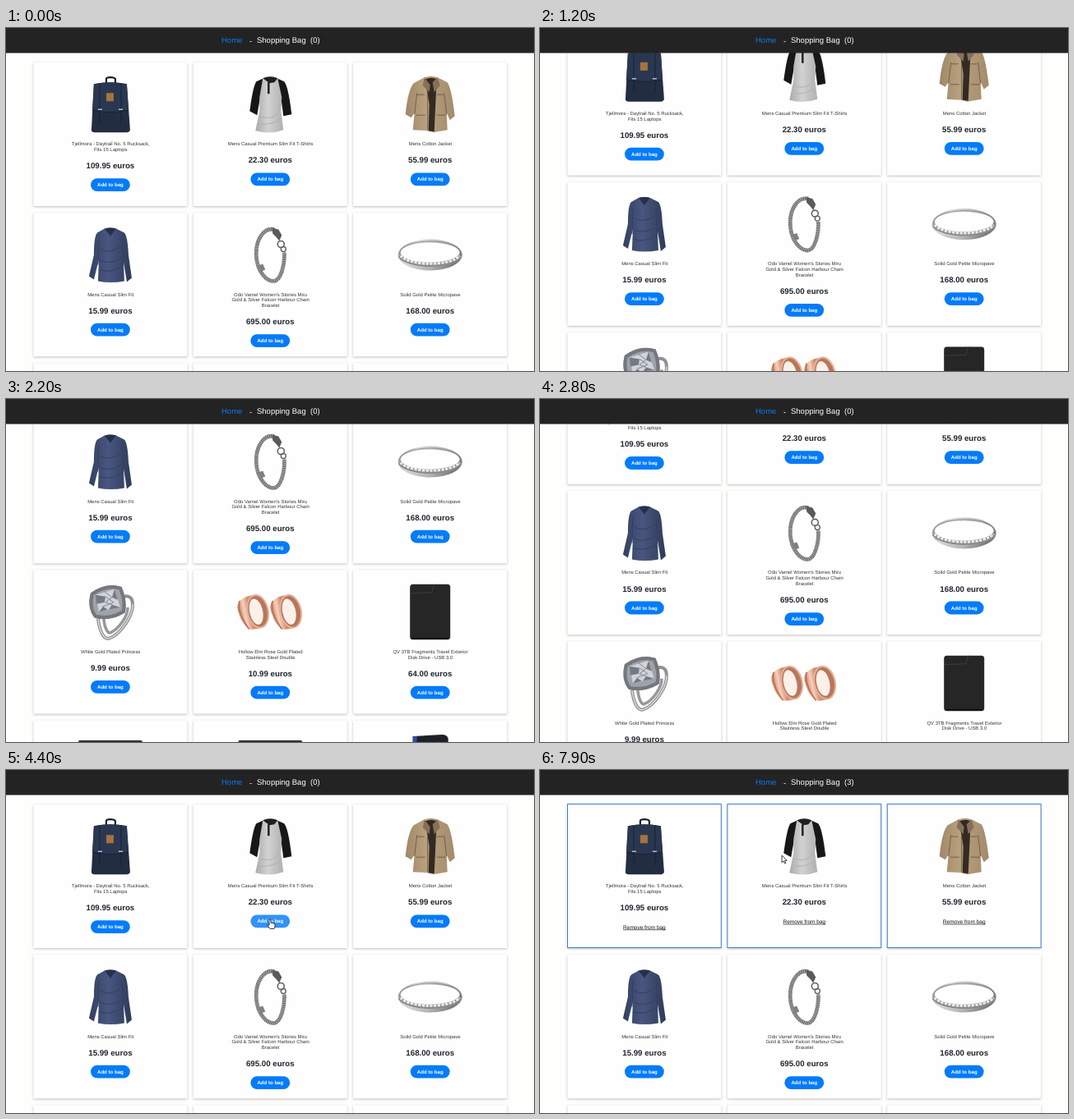
These frames come from a looping animation (642 by 418 pixels, 8000 ms). An HTML page:

```html
<!DOCTYPE html>
<html lang="en">
<head>
<meta charset="utf-8">
<title>Shop</title>
<style>
  html, body { margin: 0; height: 100%; overflow: hidden; background: #fefefd; }
  svg { display: block; width: 100vw; height: 100vh; font-family: "Liberation Sans", Arial, sans-serif; }
  text { text-rendering: geometricPrecision; }
  .card { fill: #fefefe; filter: drop-shadow(0 1.5px 1.5px rgba(0, 0, 0, .25)); }
  .border { fill: none; stroke: #3f80d2; }
  .title { font-size: 5.95px; fill: #34363a; }
  .price { font-size: 9.7px; font-weight: bold; fill: #20252f; }
  .label { font-size: 6.1px; font-weight: bold; fill: #fff; }
  .link { font-size: 6.5px; fill: #111; text-decoration: underline; }
  .card-group text { text-anchor: middle; }
  .nav { font-size: 9.5px; fill: #fff; }
</style>
</head>
<body>
<svg id="stage" viewBox="0 0 642 418">
  <defs>
    <linearGradient id="steel" x2="1" y2=".3">
      <stop stop-color="#808080"/><stop offset=".3" stop-color="#d8d8d8"/>
      <stop offset=".7" stop-color="#b4b4b4"/><stop offset="1" stop-color="#7c7c7c"/>
    </linearGradient>
    <linearGradient id="rose" x2="1">
      <stop stop-color="#c9805f"/><stop offset=".3" stop-color="#f6d0bd"/>
      <stop offset=".55" stop-color="#d18b6c"/><stop offset="1" stop-color="#e8b097"/>
    </linearGradient>
    <linearGradient id="grey" x2="1">
      <stop stop-color="#aaa"/><stop offset=".45" stop-color="#d2d2d2"/><stop offset="1" stop-color="#b0b0b0"/>
    </linearGradient>
    <linearGradient id="blue" x2="1">
      <stop stop-color="#34405f"/><stop offset=".45" stop-color="#485680"/><stop offset="1" stop-color="#303b5a"/>
    </linearGradient>
    <linearGradient id="tan" x2="1">
      <stop stop-color="#9f8768"/><stop offset=".4" stop-color="#b8a07e"/><stop offset="1" stop-color="#a38b6c"/>
    </linearGradient>
  </defs>
  <g id="page"></g>
  <rect width="642" height="30.5" fill="#232323"/>
  <g class="nav">
    <text x="262" y="18" style="fill:#0a78f5">Home</text>
    <text x="296" y="18.5">-</text>
    <text id="bag" x="305" y="18"></text>
  </g>
  <g id="cursor" stroke="#111" stroke-width=".8" fill="#fff" stroke-linejoin="round">
    <path id="arrow" d="M0 0V8.7L2 6.9 3.5 10 4.9 9.4 3.5 6.4H6.2Z"/>
    <path id="hand" d="M-1 0Q0-1 1 0V4Q2 3 3 4.3 4 3.6 4.7 4.8 6 4.3 6 6V8.5L5 11H0L-2.9 7Q-3.3 5.2-1 6.7Z"/>
  </g>
</svg>
<script>
const $ = id => document.getElementById(id);

// Product pictures are drawn around (0, 0), about 68 px tall.
const art = {
  backpack: `
    <path d="M-5-24V-31Q-5-33 0-33T6-31V-24" fill="none" stroke="#171d2b" stroke-width="2.2"/>
    <path d="M-20-25Q0-29 20-25L24 31Q23 34 20 34H-19Q-23 34-23 31Z" fill="#222d42"/>
    <path d="M-20-25Q0-29 20-25L22 7Q0 12-22 7Z" fill="#293850"/>
    <path d="M-13-26V23M13-26V23M-22 7Q0 12 22 7" fill="none" stroke="#172136" stroke-width="1"/>
    <path d="M-15 6h5M10 6h5" stroke="#b5bcc6" stroke-width="1.6"/>
    <rect x="-5" y="-14" width="9" height="10" fill="#a5733f"/>`,
  baseball: `
    <path d="M-8-32L-17-28Q-21-22-25 8L-16 13-12-10-6-27ZM8-32L17-28Q22-22 26 12L16 14 13-9 6-27Z" fill="#171717"/>
    <path d="M-9-32Q0-36 9-32L14-9 13 8 16 31Q0 37-18 32L-13 8-13-9Z" fill="url(#grey)"/>
    <path d="M-9-32Q0-36 9-32L5-27-1-26Z" fill="#202020"/>
    <path d="M-2-27V-13" stroke="#222" stroke-width="2.5"/>
    <path d="M-11 15Q3 20 11 8M-12 24Q4 25 13 17" fill="none" stroke="#aaa" stroke-width=".8"/>`,
  jacket: `
    <path d="M-7-33Q1-36 9-33L21-27Q26-20 30 14L24 19 20 10 21 31 4 34-4 32-21 31-19 10-23 16-30 12Q-27-18-20-26Z" fill="url(#tan)"/>
    <path d="M-6-31Q2-34 8-31L5 33-2 32-1 0Z" fill="#332a23"/>
    <path d="M-7-33L-9-23-1-15 0-24ZM9-33L12-23 5-15 3-27Z" fill="#86705a"/>
    <path d="M-19 12L-16-14M20 12L17-14M-16-12h9M8-12h8M-17 13h11M8 13h11M-3-15V31" fill="none" stroke="#6d5b43" stroke-width=".9"/>`,
  sweater: `
    <path d="M-7-32Q0-34 7-32L17-27Q21-23 22 0L26 28 20 33 16 8 17 32Q0 35-15 32L-14 6-20 30-26 26-20 0Q-20-23-16-27Z" fill="url(#blue)"/>
    <path d="M-7-32Q0-34 7-32L0-23Z" fill="#26304c"/>
    <path d="M-12-7Q0-1 12-10M-13 7Q1 12 13 4M-14 18Q0 23 14 14M-14-20L-15 12M14-20L16 12" fill="none" stroke="#333f60" stroke-width="1"/>`,
  bracelet: `
    <g fill="none" stroke="#636361">
      <path id="chain" d="M5-31C-8-34-18-18-17 1S-5 32 4 32 18 11 17-3" stroke-width="4.6"/>
      <use href="#chain" stroke="#b5b5b1" stroke-width="2.6" stroke-dasharray="1 1.2"/>
      <circle cx="13" cy="-13" r="4" stroke-width="1.6"/><circle cx="16" cy="-7" r="3" stroke-width="1.4"/>
    </g>
    <path d="M2-33L10-31 14-24 11-17 7-22 3-26Z" fill="#5a5a58"/>
    <path d="M-15 13L-9 11-6 18-11 20Z" fill="#80807d"/>`,
  ring: `
    <ellipse rx="39" ry="19" fill="url(#steel)"/>
    <ellipse cy="-3" rx="36" ry="12" fill="#fefefe"/>
    <ellipse cy="-2" rx="37" ry="14.5" fill="none" stroke="#858585" stroke-width=".8"/>
    <path d="M-37 1A38 14.5 0 0 0 37 1" fill="none" stroke="#8b8b8b" stroke-width="4.5"/>
    <path d="M-36 1A38 14.5 0 0 0 36 1" fill="none" stroke="#ececec" stroke-width="3" stroke-dasharray="3.4 1.3"/>`,
  diamond: `
    <g fill="none">
      <path d="M-15 8C-13 24-8 33-2 32 12 28 28 4 27-10 27-18 22-21 16-19" stroke="#8f9092" stroke-width="4"/>
      <path d="M-15 8C-13 24-8 33-2 32 12 28 28 4 27-10" stroke="#dedede" stroke-width="1.4"/>
      <path d="M-8 8C-7 20-3 26 0 25 10 21 22 4 21-6" stroke="#97989a" stroke-width="3.5"/>
    </g>
    <path id="halo" d="M-22-22Q-5-34 12-29Q18-15 16-1Q0 9-18 5Q-26-6-22-22Z" fill="#9fa2a7" stroke="#74777d" stroke-width="4.5"/>
    <use href="#halo" style="stroke:#e4e6e9;stroke-width:2" stroke-dasharray="0 3" stroke-linecap="round"/>
    <path d="M-18-21L5-28 12-6-14 0Z" fill="#d0d4da"/>
    <path d="M-18-21L-6-19-7-12-17-10ZM5-28L2-18 9-15ZM12-6L2-9-2-3ZM-14 0L-9-7-3-3Z" fill="#747a84"/>
    <path d="M-7-25L2-18-6-12 2-9M-6-19L4-12-9-7" fill="none" stroke="#81878f" stroke-width="1"/>`,
  roseRings: [-20, 20].map(x => `
    <g transform="translate(${x} 0) rotate(-12)">
      <path d="M8-20Q-6-22-14-17Q-20-13-18-2Q-17 12-10 19Q-2 22 8 20Z" fill="url(#rose)"/>
      <ellipse cx="5" rx="12.5" ry="20" fill="#b8765a"/>
      <ellipse cx="3" rx="8" ry="16" fill="#fcf1ea"/>
      <ellipse cx="5" rx="12.5" ry="20" fill="none" stroke="#e6b098" stroke-width="2"/>
      <path d="M-14-17Q-20-4-10 19" fill="none" stroke="#b86f50" stroke-width="1.6"/>
    </g>`).join(""),
  disk: `
    <rect x="-24.5" y="-34" width="49" height="67.5" rx="3.5" fill="#262627"/>
    <path d="M-24-23L2-24 5-34" fill="none" stroke="#3d3d3f"/>
    <path d="M-22 32H22" stroke="#101011" stroke-width="2"/>`,
  flatDrive: `<rect x="-39" y="-27" width="78" height="54" rx="2" fill="#303133"/>`,
  gameDrive: `
    <path d="M-21-32L14-34Q21-34 22-29V34H-21Z" fill="#1d2026"/>
    <path d="M-21-32H-16L-18 34H-21Z" fill="#2e4da0"/>`
};

const products = [
  ["backpack", "109.95", "Tjellmora - Daytrail No. 5 Rucksack,", "Fits 15 Laptops"],
  ["baseball", "22.30", "Mens Casual Premium Slim Fit T-Shirts"],
  ["jacket", "55.99", "Mens Cotton Jacket"],
  ["sweater", "15.99", "Mens Casual Slim Fit"],
  ["bracelet", "695.00", "Odo Varnel Women's Stories Miru", "Gold & Silver Falcon Harbour Chain", "Bracelet"],
  ["ring", "168.00", "Solid Gold Petite Micropave"],
  ["diamond", "9.99", "White Gold Plated Princess"],
  ["roseRings", "10.99", "Hollow Elm Rose Gold Plated", "Stainless Steel Double"],
  ["disk", "64.00", "QV 3TB Fragments Travel Exterior", "Disk Drive - USB 3.0"],
  ["flatDrive", "109.00", "Internal Solid State Drive"],
  ["flatDrive", "109.00", "Internal Solid State Drive"],
  ["gameDrive", "114.00", "Portable Gaming Drive"]
];

const LINE = 6.8;
const escapeText = s => s.replace(/&/g, "&amp;");
const cardPosition = i => [126.9 + i % 3 * 194.4, 41.7 + Math.floor(i / 3) * 183.3];

function cardMarkup([picture, price, ...lines], i) {
  const [x, y] = cardPosition(i);
  const titles = lines.map((line, n) =>
    `<text class="title" x=".3" y="${101.5 + n * LINE}">${escapeText(line)}</text>`).join("");
  return `<g class="card-group" transform="translate(${x} ${y})">
    <rect class="card" x="-93.5" width="187" height="175.3"/>
    <rect class="border" x="-93.4" y="-.2" width="186.8" height="175"/>
    <g transform="translate(0 51.5)">${art[picture]}</g>
    ${titles}
    <g transform="translate(0 ${(lines.length - 1) * LINE})">
      <text class="price" y="122.8">${price} euros</text>
      <g class="button">
        <rect x="-23.9" y="134.7" width="47.8" height="15.8" rx="7.9"/>
        <text class="label" y="144.8">Add to bag</text>
      </g>
      <text class="link" y="145">Remove from bag</text>
    </g>
  </g>`;
}

$("page").innerHTML = products.map(cardMarkup).join("");
const cards = [...document.querySelectorAll(".card-group")].map((group, i) => {
  const [x, y] = cardPosition(i);
  return {
    x, buttonY: y + 142.6 + (products[i].length - 3) * LINE,
    border: group.querySelector(".border"),
    button: group.querySelector(".button"),
    link: group.querySelector(".link")
  };
});

const DURATION = 8000, STEP = 100, CURSOR_ENTERS = 3400;
const addedAt = { 1: 4500, 2: 6000, 0: 6900 };
const scrollKeys = [[700, 0], [1200, 37.4], [1700, 115], [2200, 200], [2400, 218], [2800, 113.1], [3300, 0]];
const cursorKeys = [
  [3400, 637, 300], [3800, 470, 235], [4200, 330, 190], [4400, 321, 182.5], [4600, 321, 182.5],
  [4900, 375, 178], [5300, 500, 182], [5500, 516, 183], [6000, 516, 183], [6300, 325, 152],
  [6500, 190, 178], [6700, 127, 189], [7200, 127, 189], [7700, 149, 244], [7900, 294, 104]
];

// Linear interpolation between keys of the form [time, ...values].
function track(keys, t) {
  const next = keys.findIndex(key => key[0] > t);
  if (next === 0) return keys[0].slice(1);
  if (next < 0) return keys.at(-1).slice(1);
  const a = keys[next - 1], b = keys[next];
  const k = (t - a[0]) / (b[0] - a[0]);
  return a.slice(1).map((v, i) => v + (b[i + 1] - v) * k);
}

const show = (element, visible) => { element.style.display = visible ? "" : "none"; };

function draw(t) {
  const [scroll] = track(scrollKeys, t);
  const [x, y] = track(cursorKeys, t);
  const cursorVisible = t >= CURSOR_ENTERS;
  let count = 0, pointing = false;

  cards.forEach((card, i) => {
    const added = t >= addedAt[i];
    const hovered = cursorVisible && Math.abs(x - card.x) < 24 && Math.abs(y - card.buttonY) < 8;
    count += added;
    pointing ||= hovered;
    show(card.border, added);
    show(card.link, added);
    show(card.button, !added);
    card.button.firstElementChild.setAttribute("fill", hovered ? "#3292f8" : "#047bf8");
  });

  $("page").setAttribute("transform", `translate(0 ${-scroll})`);
  $("bag").textContent = `Shopping Bag\u00a0 (${count})`;
  $("cursor").setAttribute("transform", `translate(${x} ${y})`);
  show($("cursor"), cursorVisible);
  show($("hand"), pointing);
  show($("arrow"), !pointing);
}

const start = performance.now();
function tick() {
  const t = (performance.now() - start) % DURATION;
  draw(Math.floor(t / STEP) * STEP);
  requestAnimationFrame(tick);
}
tick();
</script>
</body>
</html>
```
